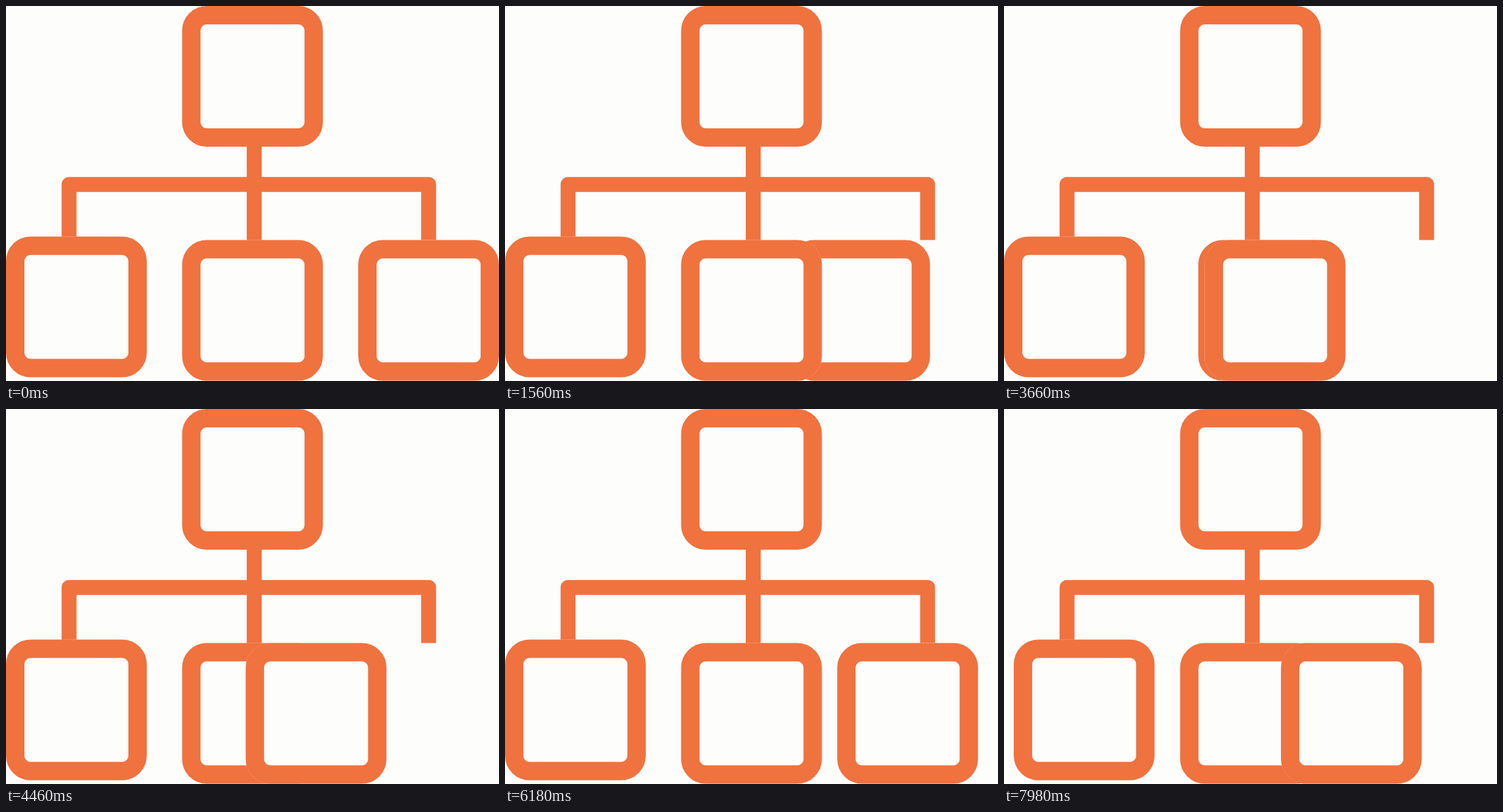
Write an HTML page that moves like this. It is 858x653 px and loops after 8 s.

```html
<!DOCTYPE html>
<html lang="en">
<head>
<meta charset="utf-8">
<title>Hierarchy shuffle</title>
<style>
  html, body { margin: 0; width: 100%; height: 100%; overflow: hidden; background: #fdfdfc; }
  svg { display: block; width: 100%; height: 100%; }
  .line { fill: none; stroke: #f0723f; stroke-width: 26; stroke-linejoin: round; }
  .fill { fill: #fdfdfc; }
  .ring { fill: none; stroke: #f0723f; stroke-width: 32; }
</style>
</head>
<body>
<svg viewBox="0 0 858 653">
  <defs>
    <g id="box">
      <rect class="fill" width="245" height="245" rx="43"/>
      <rect class="ring" x="16" y="16" width="213" height="213" rx="27"/>
    </g>
  </defs>
  <path class="line" d="M109.75 403V310.75H735.5V407.5M432 240V410"/>
  <use href="#box" x="306.5"/>
  <use href="#box" id="left" y="401.5"/>
  <use href="#box" id="back" y="407.5"/>
  <use href="#box" id="front" y="407.5"/>
</svg>
<script>
  const LOOP = 8000;

  // Tracks are [step, x] points joined by straight segments.
  const tracks = {
    left: [[167, 0], [171, 17]],
    back: [[0, 613], [88.1, 306.5]],
    front: [[68.9, 306.5], [141.2, 613], [171, 482]],
  };
  const parts = Object.entries(tracks).map(([id, track]) => [document.getElementById(id), track]);

  // Uneven rhythm: every 140 ms holds three steps of 100, 20 and 20 ms.
  function stepAt(ms) {
    if (ms < 20) return 0;
    const beat = ms - 20, rest = beat % 140;
    return 1 + 3 * Math.floor(beat / 140) + (rest >= 100) + (rest >= 120);
  }

  function along(track, step) {
    if (step <= track[0][0]) return track[0][1];
    for (let i = 1; i < track.length; i++) {
      const [s0, x0] = track[i - 1], [s1, x1] = track[i];
      if (step <= s1) return x0 + (x1 - x0) * (step - s0) / (s1 - s0);
    }
    return track[track.length - 1][1];
  }

  let start;
  function draw(now) {
    start ??= now;
    const step = stepAt((now - start) % LOOP);
    for (const [part, track] of parts) part.setAttribute('x', along(track, step).toFixed(2));
    requestAnimationFrame(draw);
  }
  requestAnimationFrame(draw);
</script>
</body>
</html>
```
